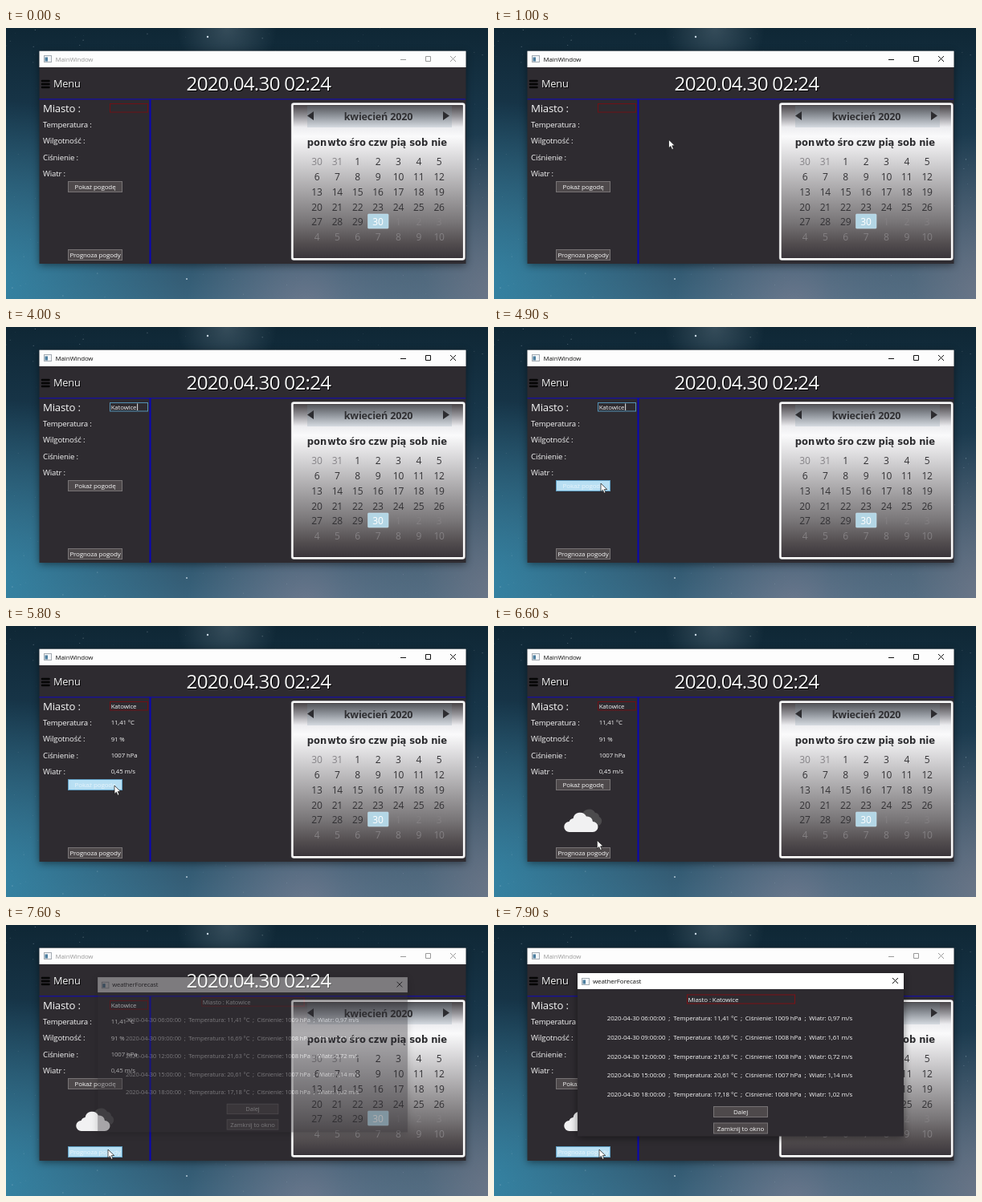
Write an HTML page that moves like this. It is 600 by 338 pixels and loops after 8 s.

```html
<!DOCTYPE html>
<html lang="pl">
<head>
<meta charset="utf-8">
<title>MainWindow</title>
<style>
  html, body { margin: 0; width: 100%; height: 100%; overflow: hidden; background: #1b3347; }
  svg { display: block; width: 600px; height: 338px; }
  text { font-family: "Open Sans", "Noto Sans", sans-serif; font-weight: 500; letter-spacing: -.015em; white-space: pre; fill: #f6f6f6; }
  .mid { text-anchor: middle; }
  .bold { font-weight: 700; fill: #303033; }
  .days { font: 700 11.5px "DejaVu Sans", sans-serif; letter-spacing: 0; fill: #2c2c2f; }
  .num { font-weight: 400; }
  .clock { font-weight: 400; letter-spacing: -.03em; }
  .lift { filter: drop-shadow(1.3px 1.3px .6px #000); }
  .win { filter: drop-shadow(0 2px 5px rgba(0, 0, 0, .45)); }
  .line { fill: none; stroke-width: 1; }
  .title text { fill: #111; font-weight: 400; }
  .title .line { stroke: #111; }
  .idle text { fill: #999; }
  .idle .line { stroke: #999; }
  .btn rect { fill: #4e494b; stroke: #777375; }
  .btn.hot rect { fill: #b8dff3; stroke: #5f9fc4; }
  .btn.hot text { fill: #e6f3fa; }
</style>
</head>
<body>
<svg id="stage" viewBox="0 0 600 338"></svg>
<script>
const LOOP = 8000, STEP = 100, CITY = 'Katowice';
const stage = document.getElementById('stage');

const text = (x, y, size, str, cls = '', extra = '') =>
  `<text x="${x}" y="${y}" font-size="${size}" class="${cls}" ${extra}>${str}</text>`;
const rect = (x, y, w, h, attrs) => `<rect x="${x}" y="${y}" width="${w}" height="${h}" ${attrs}/>`;
const button = (id, x, y, label) =>
  `<g class="btn" id="${id}">${rect(x + .5, y + .5, 67, 13, '')}${text(x + 34, y + 10, 8, label, 'mid')}</g>`;
const gradient = (id, attrs, stops) => `<linearGradient id="${id}" ${attrs}>` +
  stops.map(([at, color]) => `<stop offset="${at}" stop-color="${color}"/>`).join('') + '</linearGradient>';
const glow = (id, cx, cy, r, color, alpha, turn = '') =>
  `<radialGradient id="${id}" gradientUnits="userSpaceOnUse" cx="${cx}" cy="${cy}" r="${r}" gradientTransform="${turn}">
   <stop offset="0" stop-color="${color}" stop-opacity="${alpha}"/>
   <stop offset="1" stop-color="${color}" stop-opacity="0"/></radialGradient>`;
const appIcon = (x, y) => rect(x + .5, y + .5, 9, 8, 'fill="#f4f6f8" stroke="#a3abb2"') +
  rect(x + 1.5, y + 2.5, 3.5, 5, 'fill="#4d7f9f"');
const cross = (x, y) => `<path class="line" d="M${x} ${y}l7 7m0 -7l-7 7"/>`;

function random(seed) {
  return () => (seed = seed * 16807 % 2147483647) / 2147483647;
}

function wallpaper() {
  const rnd = random(421);
  const dot = (x, y, r, a) =>
    `<circle cx="${x.toFixed(1)}" cy="${y.toFixed(1)}" r="${r.toFixed(2)}" opacity="${a.toFixed(2)}"/>`;
  let stars = dot(251, 11, 1.2, .95) + dot(225, 313, 1, .8);
  for (let i = 0; i < 260; i++) {
    stars += dot(rnd() * 600, rnd() * 338, .25 + rnd() ** 4 * .6, .12 + rnd() * .35);
  }
  return ['sky', 'teal', 'haze', 'mauve', 'cloudTop'].map(id => rect(0, 0, 600, 338, `fill="url(#${id})"`)).join('') +
    `<g fill="#d5e4ee">${stars}</g>`;
}

function calendar() {
  const col = i => 387 + i * 25.35;
  let out = rect(354.8, 93.2, 217, 196.500, 'rx="3" fill="#8d8c90"') +
    rect(356.5, 94.7, 213.6, 193.6, 'rx="2" fill="url(#cal)" stroke="#fafafa" stroke-width="2.4"') +
    rect(375, 97, 180, 27, 'fill="url(#head)"') +
    '<path d="M383 104v11l-8 -5.5zM544 104v11l8 -5.5z" fill="#2c2c30"/>' +
    text(463.5, 115, 12.6, 'kwiecień 2020', 'mid bold');
  ['pon', 'wto', 'śro', 'czw', 'pią', 'sob', 'nie'].forEach((d, i) => {
    out += `<text x="${col(i)}" y="147" class="mid days">${d}</text>`;
  });
  out += rect(450.5, 232, 25.5, 18, 'rx="1" fill="#b3d6e5" stroke="#c6e2ee" stroke-width=".6"');
  for (let i = 0; i < 42; i++) {
    const n = i - 1, row = Math.floor(i / 7);
    const day = n < 1 ? n + 31 : n > 30 ? n - 30 : n;
    const fill = n === 30 ? '#fff' : n < 1 ? '#858387' : n > 30 ? '#848083' : '#333235';
    out += text(col(i % 7), 171.4 + row * 18.7, 12, day, 'mid num', `style="fill:${fill}"`);
  }
  return out;
}

function mainWindow() {
  const labels = [['Temperatura :', 124], ['Wilgotność :', 144.3], ['Ciśnienie :', 164.5], ['Wiatr :', 184.8]];
  const values = ['11,41 °C', '91 %', '1007 hPa', '0,45 m/s'];
  return `<g class="win">${rect(41.5, 28.7, 531, 265.3, 'fill="#2e2b30"')}</g>
    <g class="title" id="mainTitle">${rect(41.5, 28.7, 531, 20.3, 'fill="#fdfdfd"')}${appIcon(47, 34)}
      ${text(61.5, 41.8, 7.9, 'MainWindow')}
      <path class="line" d="M491 39.5h7M522.5 35.5h6v6h-6z"/>${cross(553, 35)}</g>
    <path d="M45 66h8.5m-8.5 4h8.5m-8.5 4h8.5" stroke="#050505" stroke-width="2.6" stroke-linecap="round"/>
    ${text(59, 74, 12.8, 'Menu', 'lift')}
    ${text(314.5, 78, 24.2, '2020.04.30 02:24', 'mid clock lift')}
    <path d="M41.5 88.7H572" stroke="#19138f" stroke-width="1.6"/>
    <path d="M179.5 89V294" stroke="#0907b4" stroke-width="2"/>
    ${text(46, 105, 13.2, 'Miasto :')}
    ${labels.map(([s, y]) => text(46, y, 9.6, s)).join('')}
    ${rect(129.5, 94.5, 47, 10.5, 'id="field" fill="none"')}
    ${text(130.7, 103, 7.8, '', '', 'id="city"')}
    ${rect(0, 95.5, .9, 8.5, 'id="caret" fill="#fff"')}
    <g id="values">${values.map((s, i) => text(130.7, labels[i][1] - .6, 7.8, s)).join('')}</g>
    <g id="cloud">
      <path d="M112 249a7 7 0 0 1 -2 -12a8.5 8.5 0 0 1 16 -4a5 5 0 0 1 5 5a6 6 0 0 1 -1 11z" fill="#4c4b4d"/>
      <path d="M94 257a6.5 6.5 0 0 1 -.5 -13a6 6 0 0 1 5 -4a8.8 8.8 0 0 1 16.5 -2.5a7 7 0 0 1 8 6.5a6.5 6.5 0 0 1 0 13z" fill="#f1f1f2"/>
    </g>
    ${button('show', 77, 191, 'Pokaż pogodę')}
    ${button('forecast', 77, 276, 'Prognoza pogody')}
    ${calendar()}`;
}

function popup() {
  const rows = [
    ['06', '11,41', 1009, '0,97'], ['09', '16,69', 1008, '1,61'], ['12', '21,63', 1008, '0,72'],
    ['15', '20,61', 1007, '1,14'], ['18', '17,18', 1008, '1,02']
  ].map(([h, t, p, w], i) => text(293.5, 119 + i * 23.75, 7.95,
    [`2020-04-30 ${h}:00:00`, `Temperatura: ${t} °C`, `Ciśnienie: ${p} hPa`, `Wiatr: ${w} m/s`]
      .join('\u00a0 ;\u00a0 '), 'mid'));
  return `<g id="popup"><g class="win">${rect(104, 60, 406, 203.5, 'fill="#2e2b30"')}</g>
    <g class="title">${rect(104, 60, 406, 20, 'fill="#fff"')}${appIcon(109, 66)}
    ${text(123, 73, 8, 'weatherForecast')}${cross(496, 66)}</g>
    ${rect(240.5, 87, 134, 11, 'class="line" stroke="#7d1115"')}
    ${text(241.5, 95.5, 8, 'Miasto : ' + CITY)}
    ${rows.join('')}
    ${button('next', 273, 226, 'Dalej')}${button('close', 273, 246.5, 'Zamknij to okno')}</g>`;
}

stage.innerHTML = `<defs>
  ${gradient('sky', 'x2="0" y2="1"', [[0, '#0f2735'], [.3, '#173548'], [.7, '#2b4d63'], [1, '#38627b']])}
  ${glow('teal', -10, 320, 230, '#3489aa', .85)}
  ${glow('haze', 375, 350, 150, '#868395', .65)}
  ${glow('mauve', 620, 330, 200, '#85808e', .7)}
  ${glow('cloudTop', 275, 0, 62, '#8fa3b0', .3, 'rotate(-18 275 0)')}
  ${gradient('cal', 'gradientUnits="userSpaceOnUse" x1="0" x2="0" y1="97" y2="288"', [[0, '#4d494c'],
    [.07, '#97969b'], [.14, '#ededf0'], [.2, '#fafafb'], [.36, '#d5d4d6'], [.6, '#9d9b9d'],
    [.76, '#787577'], [.9, '#524d4f'], [1, '#39343a']])}
  ${gradient('head', 'x2="0" y2="1"', [[0, '#55575c'], [.5, '#93989f'], [1, '#d5dae0']])}
</defs>${wallpaper()}${mainWindow()}${popup()}
<path id="arrow" d="M0 0v10.5l2.4 -2.3l1.7 4l1.9 -.8l-1.7 -3.9h3.4z" fill="#fff" stroke="#111" stroke-width=".7"/>
<path id="beam" d="M-2 -5h4M0 -5v10M-2 5h4" fill="none" stroke="#0a0a0a" stroke-width="1.1"/>`;

const el = {};
for (const node of stage.querySelectorAll('[id]')) el[node.id] = node;
const show = (node, on) => node.setAttribute('visibility', on ? 'visible' : 'hidden');

// time, x, y of the pointer
const path = [
  [900, 232, 152], [1200, 176, 103], [1400, 176, 103], [1500, 138.5, 102], [4200, 139, 103],
  [4700, 133, 194], [4900, 133, 195], [5200, 135, 199], [6000, 135, 199], [6800, 127, 280],
  [7600, 127, 280], [7700, 131, 280], [8000, 131, 280]
];
function pointer(t) {
  const i = Math.max(1, path.findIndex(p => p[0] > t));
  const [t0, x0, y0] = path[i - 1], [t1, x1, y1] = path[i];
  const k = Math.max(0, (t - t0) / (t1 - t0)), e = k * k * (3 - 2 * k);
  return [x0 + (x1 - x0) * e, y0 + (y1 - y0) * e];
}

const FOCUS = 1300, TYPE = 2500, KEY = 160, TYPED = 3700, CLICK = 5000, POPUP = 7600;

function draw(t) {
  const [x, y] = pointer(t);
  const place = `translate(${x.toFixed(1)} ${y.toFixed(1)})`;
  const overField = x > 129 && x < 178 && y > 93 && y < 107;
  const visible = t >= 900 && !(t >= TYPE && t < 4200);
  el.arrow.setAttribute('transform', place);
  el.beam.setAttribute('transform', place);
  show(el.arrow, visible && !overField);
  show(el.beam, visible && overField);

  el.mainTitle.classList.toggle('idle', t < 1000 || t >= POPUP);

  const focused = t >= FOCUS && t < CLICK;
  el.field.setAttribute('stroke', focused ? '#5593b5' : '#6f1016');
  const typed = t < TYPE ? 0 : Math.min(CITY.length, Math.floor((t - TYPE) / KEY) + 1);
  el.city.textContent = CITY.slice(0, typed);
  const since = t < TYPE ? t - FOCUS : Math.max(0, t - TYPED);
  show(el.caret, focused && Math.floor(since / 500) % 2 === 0);
  el.caret.setAttribute('x', 131 + (typed ? el.city.getComputedTextLength() + .6 : 0));

  show(el.values, t >= 5500);
  show(el.cloud, t >= 6100);
  const over = (top, bottom) => t > 4200 && y >= top && y < bottom;
  el.show.classList.toggle('hot', over(190, 206));
  el.forecast.classList.toggle('hot', over(275, 291));

  const open = Math.min(1, (t - POPUP + 60) / 160), s = .92 + .08 * open;
  show(el.popup, t >= POPUP);
  el.popup.setAttribute('opacity', Math.max(0, open));
  el.popup.setAttribute('transform', `translate(307 162) scale(${s}) translate(-307 -162)`);
}

const start = performance.now();
function tick() {
  const t = Math.max(0, performance.now() - start) % LOOP;
  draw(Math.floor(t / STEP) * STEP);
  requestAnimationFrame(tick);
}
tick();
</script>
</body>
</html>
```
